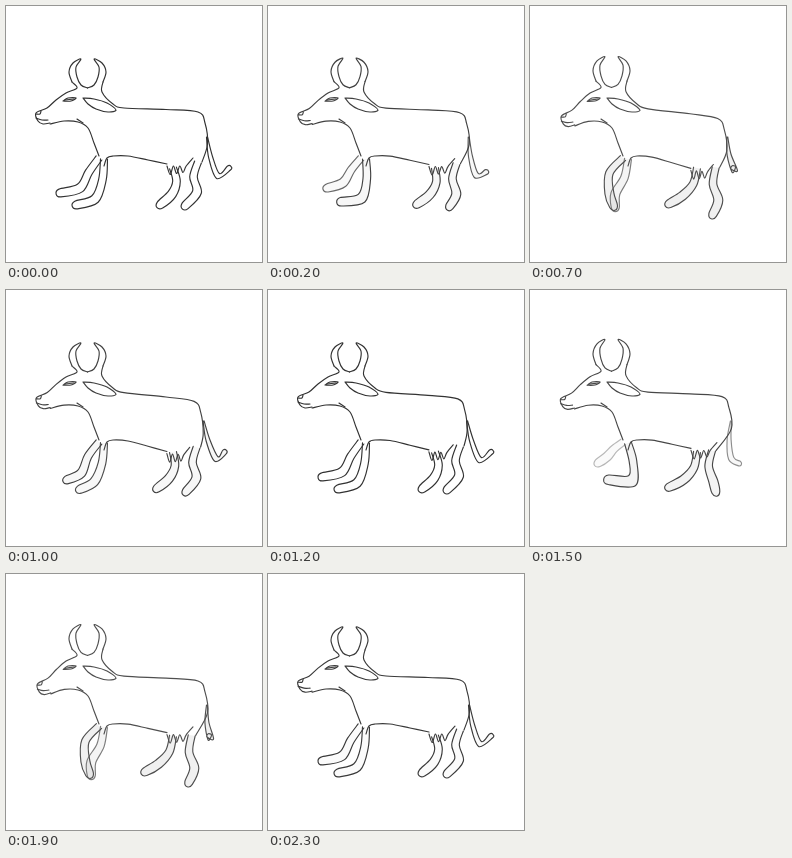
These frames come from a looping animation (256x256 px, 2400 ms). An HTML page with a canvas:

```html
<!DOCTYPE html>
<html lang="en">
<head>
<meta charset="utf-8">
<title>Walking cow</title>
<style>
  html, body { margin: 0; width: 100%; height: 100%; overflow: hidden; background: #fff; }
  canvas { display: block; width: 256px; height: 256px; }
</style>
</head>
<body>
<canvas id="stage"></canvas>
<script>
const canvas = document.getElementById('stage');
const ctx = canvas.getContext('2d');
const ratio = window.devicePixelRatio || 1;
canvas.width = canvas.height = 256 * ratio;

const LOOP = 2400, STRIDE = 1200, STEP = 100;

const clamp = v => Math.max(0, Math.min(1, v));

// Smooth hump of height 1, zero outside the given width.
const bump = (x, centre, width) =>
  Math.cos(clamp(Math.abs(x - centre) * 2 / width) * Math.PI / 2) ** 2;

// Smooth open curve through the given points.
function curve(pts) {
  const path = new Path2D();
  path.moveTo(...pts[0]);
  for (let i = 0; i < pts.length - 1; i++) {
    const a = pts[i - 1] || pts[i], b = pts[i], c = pts[i + 1], d = pts[i + 2] || c;
    path.bezierCurveTo(
      b[0] + (c[0] - a[0]) / 6, b[1] + (c[1] - a[1]) / 6,
      c[0] - (d[0] - b[0]) / 6, c[1] - (d[1] - b[1]) / 6, c[0], c[1]);
  }
  return path;
}

function direction(a, b) {
  const dx = b[0] - a[0], dy = b[1] - a[1], len = Math.hypot(dx, dy) || 1;
  return [dx / len, dy / len];
}

// The knee sits halfway down, pushed sideways by the bend.
function limb(hip, ankle, toe, bend, widths, shade, alpha = 1) {
  const [ux, uy] = direction(hip, ankle);
  const knee = [(hip[0] + ankle[0]) / 2 - uy * bend, (hip[1] + ankle[1]) / 2 + ux * bend];
  const joints = [hip, knee, ankle, toe];
  const left = [], right = [];
  joints.forEach(([x, y], i) => {
    const [dx, dy] = direction(joints[Math.max(0, i - 1)], joints[Math.min(3, i + 1)]);
    const w = widths[i];
    left.push([x - dy * w, y + dx * w]);
    right.unshift([x + dy * w, y - dx * w]);
  });
  const end = direction(ankle, toe);
  const tip = [toe[0] + end[0] * widths[3], toe[1] + end[1] * widths[3]];
  const path = curve([...left, tip, ...right]);
  ctx.globalAlpha = alpha;
  ctx.fillStyle = `rgba(110,110,110,${shade})`;
  ctx.fill(path);
  ctx.stroke(path);
  ctx.globalAlpha = 1;
}

function drawLimbs(pass, lift, sag, shade) {
  // A joint at rest, with its shift while passing and while lifting.
  const joint = (x, y, px = 0, py = 0, lx = 0, ly = 0) =>
    [x + px * pass + lx * lift, y + py * pass + ly * lift];
  const leg = [3.5, 3.8, 4.5, 4];
  const hoof = [3.5, 3.8, 4.5 + 2 * pass, 4 + pass];
  const thigh = joint(192, 156, -13, 6, -7, 6);

  limb([201 - 4 * sag, 131], joint(212, 170, -14, -2, -8, -5), joint(223, 162, -18, 15, -22),
    2, [.5, 2, 2.8, 2.5], shade, 1 - .5 * pass);
  limb([167, 162], joint(166, 188, -16, 2, -15, 2), joint(154, 199, -20, -2, -17, -1),
    -4, leg, shade);
  limb(thigh, joint(191, 186, -10, 7, -3, 9), joint(179, 200, 9, 3, 4, 10), 4, leg, shade);
  limb([98, 153], joint(89, 193, 17, -3, -4, -6), joint(70, 199, 11, -12, 17, 3),
    -3, hoof, shade, 1 - .3 * lift);
  limb([93, 152], joint(74, 182, 4, -20, 6, 6), joint(54, 187, 18, -18, 33, 15),
    1 + 7 * lift, leg, shade, 1 - .8 * pass);
  return thigh;
}

function drawBody(nod, sway, sag, thigh) {
  // Horns rise, the nose drops and the rump sinks with the walk.
  const warp = ([x, y]) => {
    const horn = clamp((90 - y) / 36) * clamp((112 - x) / 8);
    const nose = clamp((62 - x) / 30);
    const back = clamp((x - 108) / 80);
    return [
      x + 1.5 * sway * nose - 5 * sag * clamp((x - 160) / 35),
      y - 7 * nod * horn + 3.3 * sway * nose + (6 * sag + sway) * back
    ];
  };
  const line = (...pts) => ctx.stroke(curve(pts.map(warp)));

  // Mirrored horns share one curve around the crown
  const horn = [[66, 76], [63, 66], [67, 57], [75, 53], [70, 61], [71, 71], [75, 79], [81.5, 82]];
  line(...horn);
  line(...horn.map(([x, y]) => [163 - x, y]));

  // Forehead, muzzle and mouth
  line([66, 76], [71, 82], [60, 87], [50, 94], [41, 102], [30, 107], [32, 115], [37, 118], [44, 117]);
  line([30, 112], [36, 114], [42, 114]);
  line([30, 108], [34, 108], [35, 105]);

  // Jaw, neck and chest
  line([44, 118], [58, 115], [72, 116], [82, 122], [88, 137], [93, 150]);
  line([71, 113], [77, 117]);

  // Eye and ear
  line([57, 95], [62, 92], [70, 92], [65, 95], [57, 95]);
  line([59, 94], [68, 93]);
  line([77, 92], [88, 93], [101, 97], [110, 104], [102, 106], [90, 103], [82, 98], [77, 92]);

  // Back, rump and thigh
  const rump = [[97, 76], [96, 86], [107, 98], [118, 102], [160, 103.5], [192, 106], [199, 117], [201.5, 138]];
  ctx.stroke(curve([...rump.map(warp), [thigh[0] + 4, thigh[1]]]));

  // Belly and udder
  line([98, 160], [101, 152], [107, 150], [122, 150], [142, 154], [161, 158]);
  const teats = Array.from({ length: 7 }, (_, i) => [161 + 3.2 * i, i % 2 ? 169 - i / 2 : 160]);
  line(...teats, [187, 152]);
}

function draw(t) {
  const p = t % STRIDE / STRIDE;
  const pass = bump(p, .33, .5);
  const lift = bump(p, .64, .55);
  const nod = bump(p, .4, .6);
  const sway = (1 - Math.cos(2 * Math.PI * p)) / 2;
  const sag = bump(t / LOOP, .34, .62);
  const blur = Math.sin(Math.PI * p);
  const tone = 50 + 30 * blur;

  ctx.setTransform(ratio, 0, 0, ratio, 0, 0);
  ctx.fillStyle = '#fff';
  ctx.fillRect(0, 0, 256, 256);
  ctx.lineWidth = 1.15;
  ctx.lineCap = ctx.lineJoin = 'round';
  ctx.strokeStyle = `rgb(${tone},${tone},${tone})`;

  const thigh = drawLimbs(pass, lift, sag, .11 * blur);
  drawBody(nod, sway, sag, thigh);
}

const start = performance.now();
function tick() {
  const elapsed = (performance.now() - start) % LOOP;
  draw(Math.floor(elapsed / STEP) * STEP);
  requestAnimationFrame(tick);
}
tick();
</script>
</body>
</html>
```
